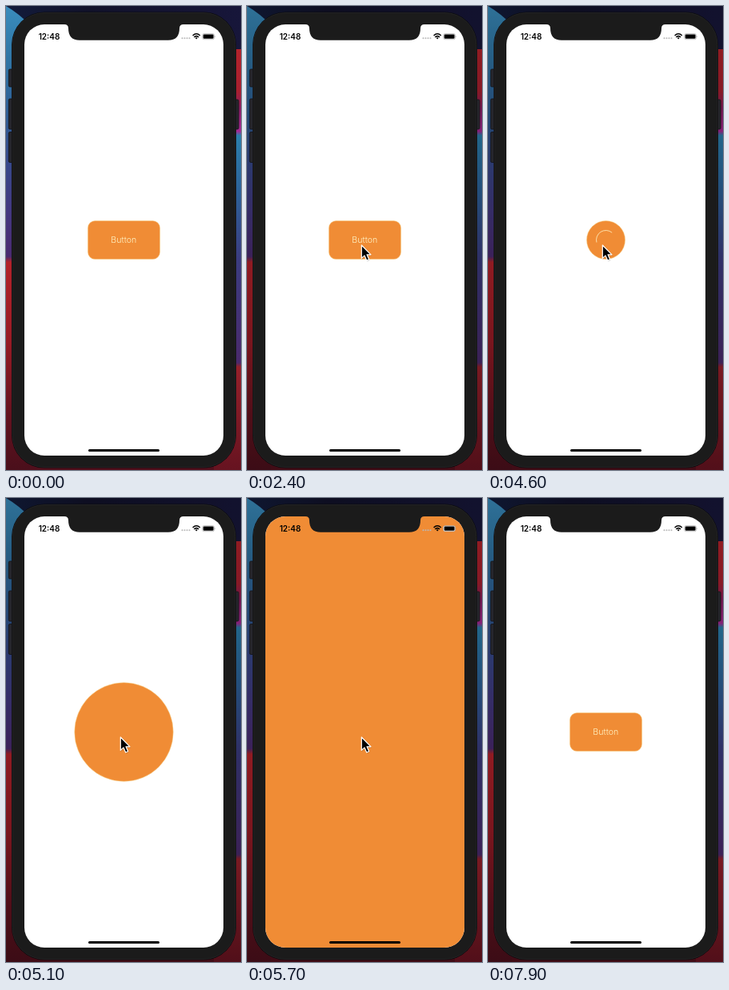
Write an HTML page that moves like this. It is 294x580 px and loops after 8 s.

```html
<!DOCTYPE html>
<html lang="en">
<head>
<meta charset="utf-8">
<title>Button transition</title>
<style>
  html, body { margin: 0; width: 100%; height: 100%; overflow: hidden; background: #15152f; }
  svg { display: block; width: 294px; height: 580px; }
  text { font-family: Inter, "Open Sans", sans-serif; text-anchor: middle; }
</style>
</head>
<body>
<svg viewBox="0 0 294 580" xmlns="http://www.w3.org/2000/svg">
  <defs>
    <linearGradient id="top">
      <stop offset="0" stop-color="#131c3c"/>
      <stop offset=".35" stop-color="#11122a"/>
      <stop offset="1" stop-color="#17163a"/>
    </linearGradient>
    <linearGradient id="left" x2="0" y2="1">
      <stop offset="0" stop-color="#3a8dbd"/>
      <stop offset=".12" stop-color="#2f74a4"/>
      <stop offset=".24" stop-color="#2e5c94"/>
      <stop offset=".34" stop-color="#37488a"/>
      <stop offset=".44" stop-color="#433880"/>
      <stop offset=".54" stop-color="#4a2a70"/>
      <stop offset=".552" stop-color="#b3222a"/>
      <stop offset=".72" stop-color="#981b25"/>
      <stop offset=".88" stop-color="#64121f"/>
      <stop offset="1" stop-color="#4a0f1b"/>
    </linearGradient>
    <linearGradient id="right" x2="0" y2="1">
      <stop offset="0" stop-color="#b3232b"/>
      <stop offset=".1" stop-color="#a8202f"/>
      <stop offset=".14" stop-color="#8a1d62"/>
      <stop offset=".195" stop-color="#a42a94"/>
      <stop offset=".205" stop-color="#2b7fac"/>
      <stop offset=".34" stop-color="#2d6299"/>
      <stop offset=".5" stop-color="#3b3c80"/>
      <stop offset=".745" stop-color="#4a2a6c"/>
      <stop offset=".755" stop-color="#96202a"/>
      <stop offset="1" stop-color="#661320"/>
    </linearGradient>
    <clipPath id="screen"><rect x="23" y="23" width="249" height="539" rx="25"/></clipPath>
  </defs>

  <rect width="294" height="580" fill="url(#top)"/>
  <path d="M0 0Q17 10 30 24L60 580H0Z" fill="url(#left)"/>
  <rect x="240" y="54" width="54" height="526" fill="url(#right)"/>
  <rect x="30" y="560" width="230" height="20" fill="#500f1c"/>
  <rect id="shade" width="294" height="580" opacity=".2"/>

  <g fill="#26262c" stroke="#121216" stroke-width=".8">
    <rect x="3.4" y="79" width="7" height="22" rx="1.5"/>
    <rect x="3.4" y="116" width="7" height="38" rx="1.5"/>
    <rect x="3.4" y="157.500" width="7" height="38" rx="1.5"/>
    <rect x="284" y="117" width="7" height="37" rx="1.5"/>
  </g>
  <rect x="7" y="7.500" width="281" height="570" rx="41" fill="#0b0b0d"/>
  <rect x="8" y="8.500" width="279" height="568" rx="40" fill="#1b1b1b" stroke="#2c2c2e" stroke-width=".6"/>

  <g clip-path="url(#screen)">
    <rect x="23" y="23" width="249" height="539" fill="#fff"/>
    <rect id="button" fill="#f08c35" stroke="#f6d58a" stroke-width=".5"/>
    <text id="label" x="147.300" y="296.200" font-size="10.600" font-weight="350" fill="#fff3c4">Button</text>
    <path id="spinner" fill="none" stroke="#fff3c4" stroke-width=".8"/>
    <path d="M73 22V23Q78 23 78 28Q78 42.700 92 42.700H203Q217 42.700 217 28Q217 23 222 23V22Z" fill="#1b1b1b"/>
  </g>

  <text x="54" y="41.500" font-size="10" font-weight="600">12:48</text>
  <g fill="#b8b8b8">
    <circle cx="220.500" cy="40.300" r="1"/>
    <circle cx="223.500" cy="40.300" r="1"/>
    <circle cx="226.500" cy="40.300" r="1"/>
    <circle cx="229.500" cy="40.300" r="1"/>
  </g>
  <g fill="none" stroke="#000" stroke-width="1.500">
    <path d="M233.600 37Q238.200 32.600 242.800 37"/>
    <path d="M235.300 39Q238.200 36.300 241.100 39"/>
  </g>
  <path d="M236.700 39.900Q238.200 38.800 239.700 39.900L238.200 41.500Z"/>
  <rect x="245.700" y="34.700" width="14.800" height="7" rx="1.900" fill="#fff" stroke="#999" stroke-width=".6"/>
  <rect x="246.700" y="35.600" width="12.900" height="5.200" rx="1.200"/>
  <path d="M261.300 37Q262.500 38.200 261.300 39.500Z" fill="#888"/>
  <rect x="103" y="554" width="89" height="3" rx="1.500"/>

  <g id="cursor">
    <path d="M.4 1V18L4.500 14.500L7.200 20.200L10.200 19L7.700 13.200H13Z" fill="#000" opacity=".18"/>
    <path d="M0 0V16.400L3.700 12.900L6.400 19L9.300 17.700L6.700 11.800H11.700Z" stroke="#fff" stroke-width="1.200" stroke-linejoin="round"/>
  </g>
</svg>
<script>
const LOOP = 8000, STEP = 100;
const CX = 147.5, CY = 292.5, WIDE = 90.2, TALL = 48.1;
const FOCUS = 1900, SHRINK = 2616, SPIN = 2716, EXPAND = 4820, REVERT = 6230;

// time, x, y of the pointer tip
const trail = [
  [800, 112, 580],
  [1400, 136.8, 318],
  [1800, 143.3, 299],
  [6600, 143.3, 299],
  [7100, 120, 580]
];

const el = id => document.getElementById(id);
const set = (id, attrs) => {
  for (const key in attrs) el(id).setAttribute(key, attrs[key]);
};
const show = (id, on) => set(id, { visibility: on ? "visible" : "hidden" });
const clamp = v => Math.min(1, Math.max(0, v));
const mix = (a, b, k) => a + (b - a) * k;
const cubic = (a, b, s) => 3 * s * (1 - s) ** 2 * a + 3 * s * s * (1 - s) * b + s ** 3;

// cubic-bezier(.95, .02, 1, .05)
function lateEase(x) {
  let low = 0, high = 1;
  for (let i = 0; i < 30; i++) {
    const mid = (low + high) / 2;
    if (cubic(.95, 1, mid) < x) low = mid; else high = mid;
  }
  return cubic(.02, .05, high);
}

function drawButton(t) {
  const busy = t >= SHRINK && t < REVERT;
  const shrink = busy ? clamp((t - SHRINK) / 100) : 0;
  const scale = busy && t > EXPAND ? 1 + 25 * lateEase(clamp((t - EXPAND) / 400)) : 1;
  const w = mix(WIDE, TALL, shrink) * scale;
  const h = TALL * scale;
  set("button", {
    x: CX - w / 2, y: CY - h / 2, width: w, height: h,
    rx: mix(9, TALL / 2, shrink) * scale
  });
  show("label", !busy);
}

function drawSpinner(t) {
  const on = t >= SPIN && t < EXPAND;
  show("spinner", on);
  if (!on) return;
  const start = (t - SPIN) / 400 * 2 * Math.PI - Math.PI / 2;
  const point = a => `${CX + 12 * Math.cos(a)} ${CY + 12 * Math.sin(a)}`;
  set("spinner", { d: `M${point(start)}A12 12 0 0 1 ${point(start + .8 * Math.PI)}` });
}

function drawCursor(t) {
  const i = trail.findIndex(p => p[0] > t);
  show("cursor", i > 0);
  if (i < 1) return;
  const [t0, x0, y0] = trail[i - 1], [t1, x1, y1] = trail[i];
  const k = (t - t0) / (t1 - t0);
  const eased = i === trail.length - 1 ? k * k : 1 - (1 - k) ** 2;
  set("cursor", { transform: `translate(${mix(x0, x1, eased)} ${mix(y0, y1, eased)})` });
}

function draw(t) {
  show("shade", t >= FOCUS);
  drawButton(t);
  drawSpinner(t);
  drawCursor(t);
}

const begin = performance.now();
function tick() {
  const t = (performance.now() - begin) % LOOP;
  draw(Math.floor(t / STEP) * STEP);
  requestAnimationFrame(tick);
}
tick();
</script>
</body>
</html>
```
